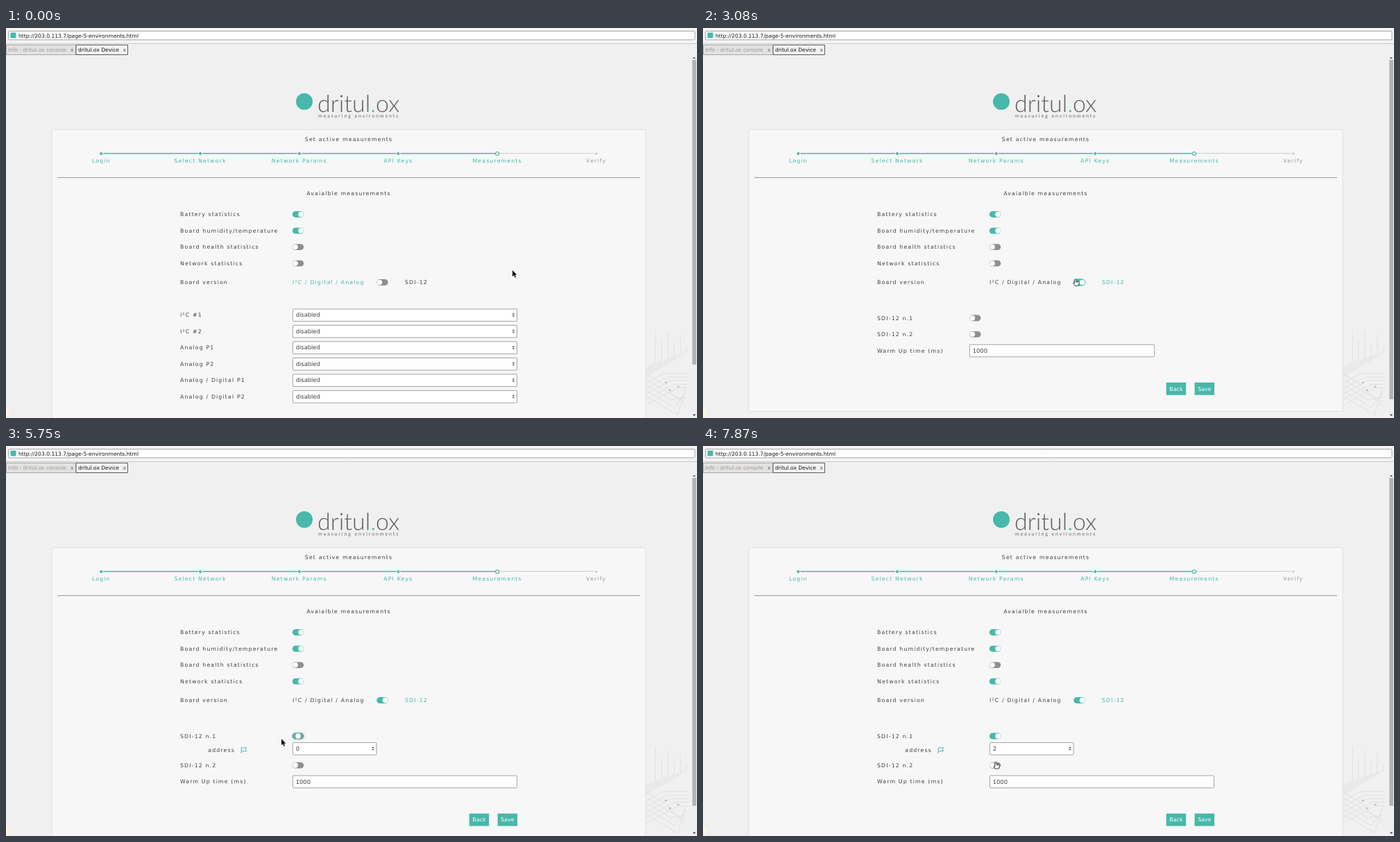
An HTML page with a canvas for the animation above (8 s loop, 996 by 562 pixels).

```html
<!DOCTYPE html>
<html lang="en">
<head>
<meta charset="utf-8">
<title>Device setup</title>
<style>
html, body { margin: 0; width: 100%; height: 100%; overflow: hidden; background: #f0f0f0; }
canvas { display: block; }
</style>
</head>
<body>
<canvas id="stage" width="996" height="562"></canvas>
<script>
const ctx = document.getElementById('stage').getContext('2d');
const LOOP = 8000;
const TEAL = '#47b8a9', INK = '#3f3f46';
const SANS = '"DejaVu Sans", sans-serif';
const BRAND = ['dritul', '.', 'ox'];
const NAME = BRAND.join('');
const LABEL = { size: 7.78, spacing: 1.167 };

const ARROW = new Path2D('M0 0V9.2L2.1 7.3L3.6 10.7L5.1 10L3.6 6.8H6.4Z');
const HAND = new Path2D('M-1.1 1Q0-.3 1.1 1V3.6L4.6 4.4Q5.7 4.8 5.5 6.5L4.5 8.6V10H-.8L-2.8 6.9Q-3 5.2-1.1 6.4Z');

// [first step, last step, steps, x, y, bend x, bend y]
const START = [730, 349];
const MOVES = [
  [500, 1210, 7, 542, 365, 640, 325],
  [1330, 1330, 1, 542, 366],
  [1670, 1670, 1, 541, 361],
  [3080, 3710, 7, 414, 336, 505, 366],
  [4080, 4210, 2, 418, 336],
  [4460, 5120, 7, 381, 378, 405, 345],
  [5210, 5210, 1, 384, 405],
  [5330, 5330, 1, 391, 414],
  [5460, 5750, 3, 397, 422],
  [5870, 5870, 1, 397, 419],
  [6040, 6120, 2, 395, 418.5],
  [6290, 6620, 4, 430, 437, 405, 432],
  [6750, 6750, 1, 438, 458],
  [6870, 6870, 1, 442, 472],
  [7460, 7870, 5, 422, 455, 445, 455]
];

const within = (t, from, to) => t >= from && t < to;
const smooth = p => p * p * (3 - 2 * p);
const bezier = (a, b, c, u) => (1 - u) ** 2 * a + 2 * u * (1 - u) * b + u * u * c;
const slide = (t, from) => t < from + 125 ? 0 : t < from + 240 ? 0.5 : 1;

function cursorAt(t) {
  let [x, y] = START;
  for (const [from, to, steps, x1, y1, bx = (x + x1) / 2, by = (y + y1) / 2] of MOVES) {
    if (t < from) break;
    const step = steps > 1 ? Math.floor((t - from) * (steps - 1) / (to - from)) + 1 : 1;
    const u = smooth(Math.min(step / steps, 1));
    x = bezier(x, bx, x1, u);
    y = bezier(y, by, y1, u);
  }
  return [x, y];
}

function text(str, x, y, color = INK, { size = 8.3, spacing = 0, align = 'left', font = SANS, weight = 400 } = {}) {
  ctx.font = `${weight} ${size}px ${font}`;
  ctx.textRendering = 'geometricPrecision';
  ctx.letterSpacing = spacing + 'px';
  ctx.fillStyle = color;
  ctx.textAlign = 'left';
  const width = ctx.measureText(str).width;
  ctx.fillText(str, align === 'center' ? x - width / 2 : x, y + 2.9);
  return width;
}

const label = (str, x, y, color) => text(str, x, y, color, LABEL);
const centered = (str, x, y, color) => text(str, x, y, color, { ...LABEL, align: 'center' });

function rect(x, y, w, h, fill, stroke, radius = 0, line = 1) {
  ctx.beginPath();
  ctx.roundRect(x, y, w, h, radius);
  if (fill) { ctx.fillStyle = fill; ctx.fill(); }
  if (stroke) { ctx.strokeStyle = stroke; ctx.lineWidth = line; ctx.stroke(); }
}

function disc(x, y, r, fill, stroke, line = 1) {
  ctx.beginPath();
  ctx.arc(x, y, r, 0, Math.PI * 2);
  ctx.fillStyle = fill;
  ctx.fill();
  if (stroke) { ctx.strokeStyle = stroke; ctx.lineWidth = line; ctx.stroke(); }
}

function line(points, color, width = 1) {
  ctx.beginPath();
  for (let i = 0; i < points.length; i += 2) ctx.lineTo(points[i], points[i + 1]);
  ctx.strokeStyle = color;
  ctx.lineWidth = width;
  ctx.stroke();
}

function triangle(x, y, w, h, color) {
  ctx.beginPath();
  ctx.moveTo(x - w, y);
  ctx.lineTo(x + w, y);
  ctx.lineTo(x, y + h);
  ctx.fillStyle = color;
  ctx.fill();
}

function browser() {
  rect(0, 0, 996, 562, '#f0f0f0');
  rect(0, 0, 996, 22, '#f5f4f3');
  line([0, 22.5, 996, 22.5], '#c9c9c9');
  rect(3.5, 4.5, 989.5, 12.5, '#fff', '#a5a5a5', 1.5);
  rect(6.5, 6.5, 8, 8, TEAL);
  text('http://203.0.113.7/page-5-environments.html', 18, 10.7, '#111', { size: 7.6 });
  rect(.5, 24.5, 100, 14, '#e3e2e1', '#a9a9a9');
  text(`Info - ${NAME} console`, 3, 31, '#999', { size: 7.5 });
  text('x', 93, 31, '#666', { size: 7.5 });
  rect(101, 24.5, 74.5, 14, '#f2f2f2', '#5c5c5c');
  text(`${NAME} Device`, 104, 31, '#111', { size: 7.5 });
  text('x', 168.5, 31, '#555', { size: 7.5 });
}

function circuit() {
  const color = '#dcdcdc';
  for (let i = 0; i < 6; i++) {
    const x = 936 + i * 9, top = 434 + (i * 17) % 30, bend = 482 - i * 3;
    line([x, top, x, bend, 922, bend + (x - 922) * .6], color, .8);
  }
  for (let i = 0; i < 5; i++) {
    const y = 512 + i * 8, x = 948 + i * 5;
    line([922, y, x, y - (x - 922) * .55, 984, y - (x - 922) * .55], color, .8);
    line([922, y - 14, x, y - 14 + (x - 922) * .6, 980, 546 - i * 7], color, .8);
  }
  for (const [x, y] of [[951, 510], [969, 516], [957, 521]]) triangle(x, y, 2, 2.5, '#b4b4b4');
}

function logo() {
  disc(430, 106, 12, TEAL);
  const style = { size: 34, font: 'Lato, sans-serif', weight: 300 };
  let x = 449;
  BRAND.forEach((part, i) => { x += text(part, x, 118.5, i === 1 ? TEAL : '#5f5f5f', style); });
  text('measuring environments', 450, 125.7, '#666', { size: 7, spacing: 1.9, font: 'Lato, sans-serif' });
}

function steps() {
  const names = ['Login', 'Select Network', 'Network Params', 'API Keys', 'Measurements', 'Verify'];
  names.forEach((name, i) => {
    const x = 137.3 + i * 142.7, y = 181, done = i < 4;
    if (i < 5) line([x + 3, y - .3, x + 139.7, y - .3], done ? TEAL : '#ccc', done ? 1.4 : 1);
    if (i === 4) disc(x, y, 2.5, '#f7f7f7', TEAL, 1.2);
    else disc(x, y, done ? 2.1 : 1.6, done ? TEAL : '#c4c4c4');
    centered(name, x, 191.4, i < 5 ? TEAL : '#999');
  });
}

function toggle(x, y, on = 0, ring = false) {
  const mix = (a, b) => Math.round(a + (b - a) * on);
  const color = `rgb(${mix(143, 71)},${mix(143, 184)},${mix(143, 169)})`;
  if (ring) rect(x - 8.8, y - 5, 17.6, 10, '#eef6f5', '#7cc5bb', 5, .8);
  rect(x - 8.2, y - 4.4, 16.4, 8.8, color, null, 4.4);
  disc(x - 4 + 8 * on, y, 3.8, '#fff');
}

function field(x, y, w, value, select = false, focus = false) {
  if (focus) rect(x - .5, y - 9.5, w + 1, 19, null, '#bcd9ee', 2, 1.4);
  rect(x + .4, y - 8.6, w - .8, 17.7, '#fff', focus ? '#6ba7cf' : '#999', 1, .9);
  text(value, x + 4.8, y);
  if (select) {
    triangle(x + w - 5.6, y - .8, 1.8, -2, '#444');
    triangle(x + w - 5.6, y + .8, 1.8, 2, '#444');
  }
}

function button(name, x, y) {
  rect(x, y - 9, 28.5, 18, TEAL);
  text(name, x + 14.25, y - .2, '#fff', { size: 7.9, align: 'center' });
}

function dropdown(active) {
  rect(413.5, 445.5, 120.5, 100, '#fff', '#bca574', 0, .9);
  for (let i = 0; i < 10; i++) {
    const y = 450.4 + i * 9.93;
    if (i === active) rect(414, y - 4.9, 119.5, 9.9, '#1e90ff');
    text(String(i), 417.5, y, i === active ? '#fff' : INK);
  }
}

function scrollbar(bottom) {
  rect(988, 39, 8, 523, '#efefef');
  rect(989.3, 46, 5.7, bottom - 46, '#b3b3b3', null, .5);
  triangle(992, 44, 2.2, -2.2, '#555');
  triangle(992, 556.8, 2.2, 2.2, '#333');
}

function analogForm() {
  ['I²C #1', 'I²C #2', 'Analog P1', 'Analog P2', 'Analog / Digital P1', 'Analog / Digital P2'].forEach((name, i) => {
    const y = 413.5 + i * 23.5;
    label(name, 251, y - .3);
    field(413, y, 324, 'disabled', true);
  });
}

function sdiForm(t) {
  const wide = t >= 5620;
  const drop = wide ? 18.8 : 0, x = wide ? 421 : 392.3;
  label('SDI-12 n.1', 251, 417.7);
  toggle(x, 418, wide ? slide(t, 5620) : 0, within(t, 5620, 6620));
  if (wide) {
    label('address', 291.2, 438.3);
    line([339.2, 443, 339.2, 434.8, 346.8, 434.8, 345, 437.3, 346.8, 439.8, 339.2, 439.8], TEAL, 1);
    field(413, 436, 121.5, t < 7330 ? '0' : '2', true, within(t, 6620, 7870));
  }
  label('SDI-12 n.2', 251, 441.2 + drop);
  toggle(x, 441.3 + drop);
  label('Warm Up time (ms)', 251, 464.6 + drop);
  field(wide ? 413 : 384, 464.8 + drop, wide ? 324 : 267, '1000');
  button('Back', 667.7, 519.8 + drop);
  button('Save', 708.6, 519.8 + drop);
  if (within(t, 6620, 7330)) dropdown(t < 6750 ? 0 : t < 6870 ? 1 : 2);
}

function pointer(t) {
  const [x, y] = cursorAt(t);
  const lower = t < 1670 ? [] : t < 5620 ? [[392, 418], [392, 441]] : [[421, 418], [421, 460]];
  const targets = [[421, 268], [421, 292], [421, 315], [421, 339], [542.5, 366], ...lower];
  const over = targets.some(([tx, ty]) => Math.abs(x - tx) <= 9 && Math.abs(y - ty) <= 5.5);
  ctx.save();
  ctx.translate(x, y);
  ctx.lineJoin = 'round';
  ctx.lineWidth = .9;
  if (over) {
    ctx.fillStyle = '#fff';
    ctx.strokeStyle = '#333';
    ctx.fill(HAND);
    ctx.stroke(HAND);
    line([1.1, 3.8, 1.1, 5.6], '#333', .6);
    line([2.8, 4.2, 2.8, 5.8], '#333', .6);
  } else {
    ctx.strokeStyle = '#fff';
    ctx.stroke(ARROW);
    ctx.fillStyle = '#111';
    ctx.fill(ARROW);
  }
  ctx.restore();
}

function draw(t) {
  const sdi = t >= 1670;
  browser();
  circuit();
  logo();
  rect(66, 146.5, 856, sdi && t < 5620 ? 406 : 430, '#f7f7f7', '#e0e0e0', 1.5);
  centered('Set active measurements', 494, 159.6);
  steps();
  line([74, 215.6, 914, 215.6], '#979797');
  centered('Avaialble measurements', 494, 238);

  const states = [1, 1, 0, t >= 4460 ? slide(t, 4460) : 0];
  ['Battery statistics', 'Board humidity/temperature', 'Board health statistics', 'Network statistics'].forEach((name, i) => {
    const y = 268.3 + i * 23.55;
    label(name, 251, y);
    toggle(421, y + .2, states[i], i === 3 && within(t, 4460, 5540));
  });

  label('Board version', 251, 366.2);
  label('I²C / Digital / Analog', 413, 366.2, sdi ? INK : TEAL);
  toggle(542.5, 366.5, sdi ? slide(t, 1670) : 0, within(t, 1670, 3870));
  label('SDI-12', 575, 366.2, sdi ? TEAL : INK);

  if (sdi) sdiForm(t); else analogForm();
  scrollbar(!sdi ? 485 : t < 5620 ? 535 : 518.5);
  rect(-4, 548, 8, 14, '#fff6df', null, 4);
  pointer(t);
}

const began = performance.now();
function tick() {
  draw((performance.now() - began) % LOOP);
  requestAnimationFrame(tick);
}
draw(0);
requestAnimationFrame(tick);
</script>
</body>
</html>
```
